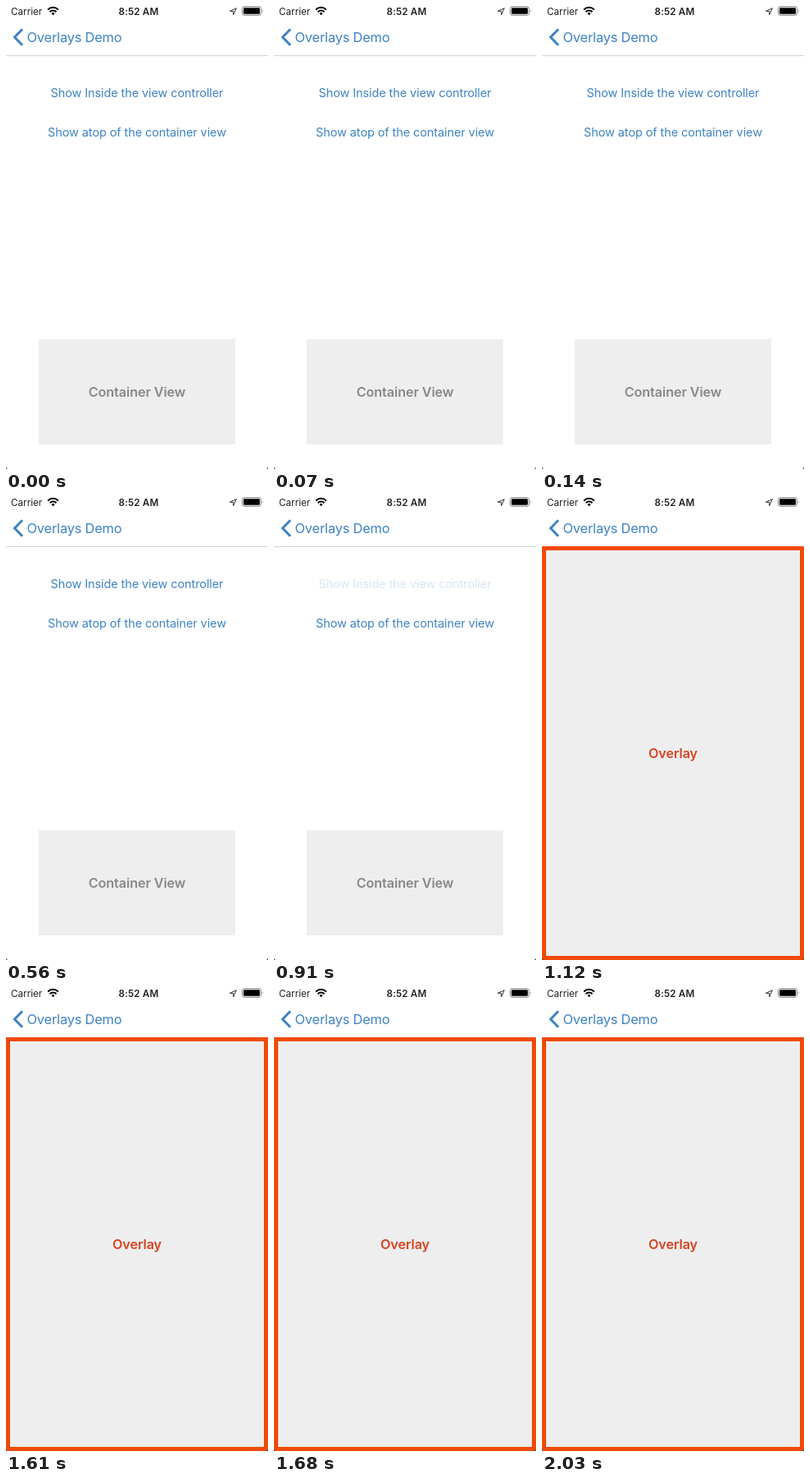
These frames come from a looping animation (320 by 564 pixels, 2100 ms). An HTML page:

```html
<!DOCTYPE html>
<html lang="en">
<head>
<meta charset="utf-8">
<title>Overlays Demo</title>
<style>
  html, body { margin: 0; width: 100%; height: 100%; overflow: hidden; background: #fff; }
  svg { display: block; width: 320px; height: 564px; font-family: Inter, sans-serif; }
  .status { font-size: 11.7px; fill: #222; }
  .link { font-size: 14.5px; letter-spacing: -.1px; fill: #3d82c4; text-anchor: middle; }
  .title { font-size: 16.4px; letter-spacing: -.2px; fill: #3d82c4; }
  .label { font-size: 16.2px; letter-spacing: -.1px; font-weight: 600; text-anchor: middle; }
</style>
</head>
<body>
<svg viewBox="0 0 320 564">
  <rect width="320" height="564" fill="#fff"/>

  <g class="status">
    <text x="6" y="10.5">Carrier</text>
    <text x="162" y="10.5" text-anchor="middle" font-weight="600" letter-spacing=".15">8:52 AM</text>
  </g>
  <g fill="none" stroke="#000" stroke-width="2">
    <path d="M51.2 4.6a8.6 8.6 0 0 1 12.6 0M53.5 7.2a5.5 5.5 0 0 1 8 0"/>
    <path d="M57.5 11.2l-2-2.2a2.9 2.9 0 0 1 4 0z" fill="#000" stroke="none"/>
    <path d="M273.3 6.3l8-3.6-3.6 8v-4.4z" stroke="#333" stroke-width="1"/>
    <rect x="288.5" y=".8" width="23" height="10.4" rx="2.6" stroke="#777" stroke-width="1"/>
  </g>
  <rect x="290" y="2.2" width="20" height="7.6" rx="1.4"/>
  <path d="M313 4.2q1.6 1.8 0 3.6z" fill="#777"/>

  <path d="M20 28.2L10.5 38l9.5 9.8" fill="none" stroke="#3d82c4" stroke-width="3"/>
  <text class="title" x="25.5" y="44">Overlays Demo</text>

  <g id="page">
    <rect y="60" width="320" height="1" fill="#d2d2d2"/>
    <text id="button" class="link" x="160" y="110.5">Show Inside the view controller</text>
    <text class="link" x="160" y="158.5">Show atop of the container view</text>
    <rect x="40" y="406" width="240" height="128" fill="#eee"/>
    <text class="label" x="160" y="476" fill="#888">Container View</text>
  </g>

  <g id="overlay">
    <rect x="2.5" y="62.5" width="315" height="499" fill="#eee" stroke="#f04a06" stroke-width="5"/>
    <text class="label" x="160" y="318" fill="#d8431f">Overlay</text>
  </g>

  <path d="M0 562l2 2H0zM320 562l-2 2h2z" fill="#444"/>
</svg>
<script>
  const LOOP = 2100, PRESS = 910, SHOW = 1050;
  const [page, button, overlay] = ['page', 'button', 'overlay'].map(id => document.getElementById(id));
  const start = performance.now();

  function draw(now) {
    const t = Math.max(0, now - start) % LOOP;
    button.style.opacity = t >= PRESS ? .2 : 1;
    page.style.display = t < SHOW ? '' : 'none';
    overlay.style.display = t < SHOW ? 'none' : '';
    requestAnimationFrame(draw);
  }
  draw(start);
</script>
</body>
</html>
```
